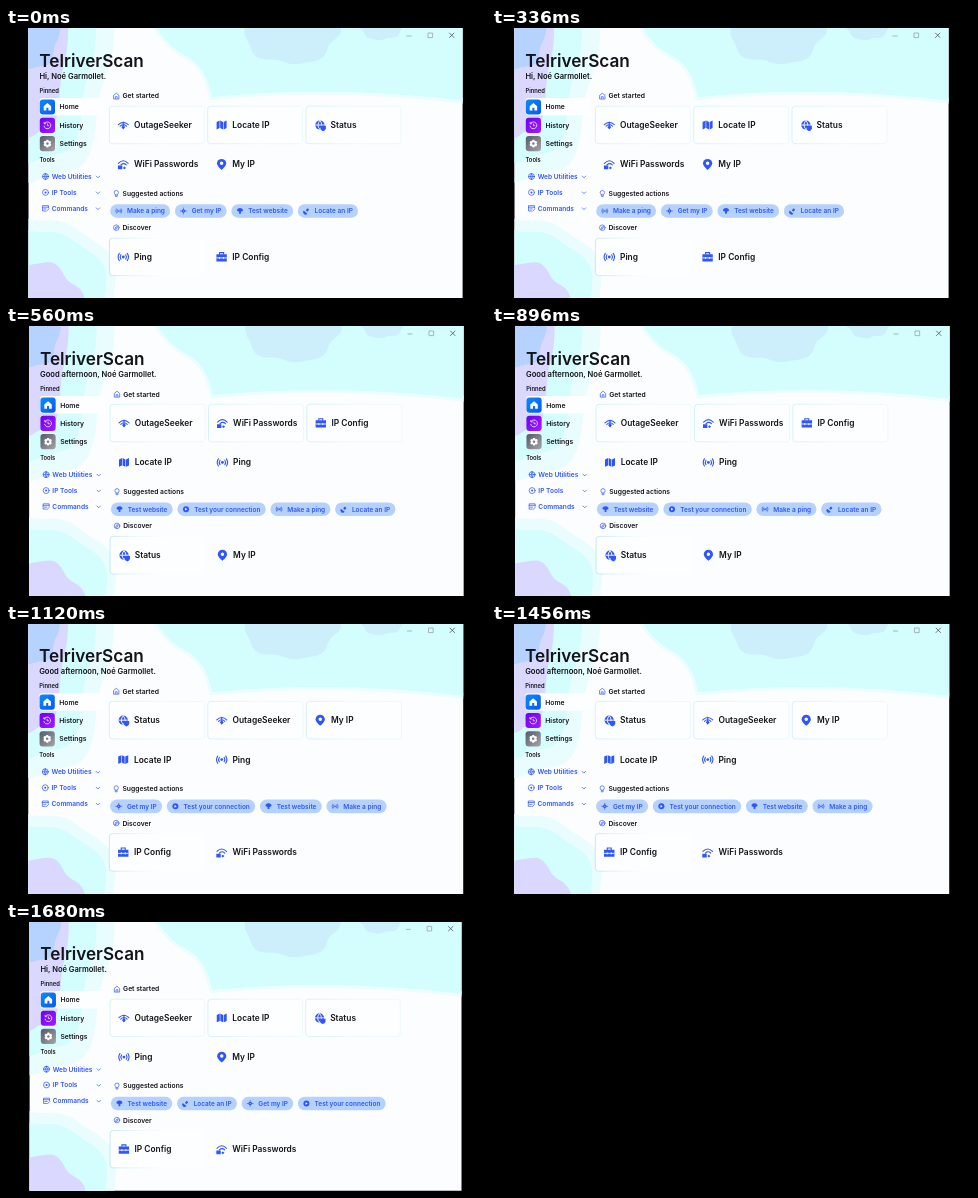
Write an HTML page that moves like this. It is 480 px wide and 270 px high and loops after 2240 ms.

```html
<!DOCTYPE html>
<html lang="en">
<head>
<meta charset="utf-8">
<style>
html, body { margin: 0; width: 100%; height: 100%; overflow: hidden; background: #000; }
svg { display: block; width: 100vw; height: 100vh; font-family: Inter, sans-serif; font-weight: 600; }
.icon { fill: #2f56f6; stroke: none; }
.line { fill: none; stroke: #2f56f6; stroke-width: 1.1; stroke-linecap: round; }
.white { fill: #fff; stroke: none; }
.cut { fill: none; stroke: #fff; stroke-width: .9; }
</style>
</head>
<body>
<svg id="stage" viewBox="0 0 480 270">
  <defs>
    <clipPath id="window"><rect x="22.5" y="-5" width="434.1" height="275.6"/></clipPath>
    <linearGradient id="home" x2="1" y2="1"><stop stop-color="#0a8cff"/><stop offset="1" stop-color="#0759ef"/></linearGradient>
    <linearGradient id="history" x2="1" y2="1"><stop stop-color="#6a00f4"/><stop offset="1" stop-color="#a51cff"/></linearGradient>
    <linearGradient id="settings" x2="1" y2="1"><stop stop-color="#55596b"/><stop offset="1" stop-color="#a7a5a6"/></linearGradient>
    <linearGradient id="edge" x2="1"><stop stop-color="#cdeff5"/><stop offset=".5" stop-color="#ecf8fb"/><stop offset="1" stop-color="#e8f7fb"/></linearGradient>
    <linearGradient id="fade" x2="1"><stop stop-color="#b9e3ec"/><stop offset=".6" stop-color="#e8f8fb" stop-opacity="0"/></linearGradient>
  </defs>
</svg>
<script>
const STEP = 560;
const INK = '#14141a', BLUE = '#2f56f6';
const CYAN = '#d4fdfe', LAVENDER = '#dad8fe', SKY_BLUE = '#b5d3fe';
const stage = document.getElementById('stage');

// Glyphs are drawn around 0,0 in a box of about 11 units.
const disc = r => `<circle class="icon" r="${r}"/>`;
const ring = '<circle class="line" r="4.5"/>';
const solid = d => `<path class="icon" d="${d}"/>`;
const line = d => `<path class="line" d="${d}"/>`;
const white = d => `<path class="white" d="${d}"/>`;
const cut = d => `<path class="cut" d="${d}"/>`;
const meridians = 'M-4.5 0H4.5M0-4.5Q-3.8 0 0 4.5M0-4.5Q3.8 0 0 4.5';

const glyphs = {
  outage: line('M-5-.3Q0-5 5-.3M-3.2 1.2Q0-2 3.2 1.2M0-3V3') + solid('M-2 2L0 4.5 2 2 0 .4z'),
  map: solid('M-5-3L-2-4.4V3L-5 4.4zM-1.4-4.4L1.4-3V4.4L-1.4 3zM2-3L5-4.4V3L2 4.4z'),
  status: disc(4.6) + cut(meridians) + solid('M.6.8H6V3.5Q5.4 5.7 3.3 6.2 1 5.6.6 3.5z'),
  wifi: line('M-4.8-1Q0-6 4.8-1M-2.4.6Q.4-2 3 .6') + solid('M-5.4 1.2H-1V5H-5.4zM1 2.2L2.8 3.6 1 5-.4 3.6z'),
  pin: solid('M0 5.6Q-4.6 1.6-4.6-1A4.6 4.4 0 0 1 4.6-1Q4.6 1.6 0 5.6z') + white('M0-2.8A1.7 1.7 0 0 1 0 .7 1.7 1.7 0 0 1 0-2.8'),
  ping: disc(1.4) + line('M-2.4-2.2Q-3.9 0-2.4 2.2M2.4-2.2Q3.9 0 2.4 2.2M-4-3.6Q-6.4 0-4 3.6M4-3.6Q6.4 0 4 3.6'),
  config: solid('M-5.2-2.8H5.2V4.4H-5.2z') + line('M-2-3V-4.4H2V-3') + cut('M-5.2.9H5.2M-2 0V2M2 0V2'),
  target: disc(3) + line('M-5 0H5M0-5V5') + cut('M-1 0H1'),
  site: solid('M-5-.5A5 4.5 0 0 1 5-.5L1.5 1.3V4.5H-1.5V1.3z'),
  play: disc(5) + white('M-1.5-2.2L2.2 0-1.5 2.2z'),
  locate: solid('M-4.6-.8A4 4 0 0 0 1.6 4.4zM-1-1.4L2-4.6 4.6-2 1.4 1.2z'),
  web: ring + line(meridians),
  tools: ring + disc(1.5),
  commands: line('M4.5-.5V-4H-4.5V4H0M-4.5-1.7H4.5M-2.5 1H1M1.5 4.5L5 1'),
  start: line('M-4.3 4.3V-1L0-4.6 4.3-1V4.3zM-1.5 4V1H1.5V4'),
  bulb: line('M-1.5 2Q-3.4.4-3.4-1.5A3.4 3.4 0 0 1 3.4-1.5Q3.4.4 1.5 2zV4.8H1.5V2'),
  compass: ring + line('M-2 2L-1-1 2-2 1 1z'),
  home: white('M0-4.6L4.4-.8V4.2H1.2V1H-1.2V4.2H-4.4V-.8z'),
  history: cut('M-3.3-2.3A4 4 0 1 1-4 .6M-3.8-4V-1.8H-1.6M0-2V.4H2'),
  settings: white('M-1-4.5H1L1.6-3 3.4-3.2 4.5-1.4 3.5 0 4.5 1.4 3.4 3.2 1.6 3 1 4.5H-1L-1.6 3-3.4 3.2-4.5 1.4-3.5 0-4.5-1.4-3.4-3.2-1.6-3zM0-1.5A1.5 1.5 0 0 0 0 1.5 1.5 1.5 0 0 0 0-1.5')
};
const cards = {
  outage: 'OutageSeeker', map: 'Locate IP', status: 'Status', wifi: 'WiFi Passwords',
  pin: 'My IP', ping: 'Ping', config: 'IP Config'
};
const actions = {
  ping: 'Make a ping', target: 'Get my IP', site: 'Test website',
  locate: 'Locate an IP', play: 'Test your connection'
};

// view: x, y, scale of the slightly shifted window
const scenes = [
  { view: [0, 0, 1], greeting: 'Hi',
    cards: 'outage map status wifi pin ping config', pills: 'ping target site locate' },
  { view: [.6, 0, 1.001], greeting: 'Good afternoon',
    cards: 'outage wifi config map ping status pin', pills: 'site play ping locate' },
  { view: [-.3, -1, 1.002], greeting: 'Good afternoon',
    cards: 'status outage pin map ping config wifi', pills: 'target play site ping' },
  { view: [1.2, -.6, .995], greeting: 'Hi',
    cards: 'outage map status ping pin config wifi', pills: 'site locate target play' }
];

const text = (x, y, size, label, fill = INK) =>
  `<text x="${x}" y="${y + size * .36}" font-size="${size}" fill="${fill}">${label}</text>`;
const glyph = (name, x, y, scale = 1) =>
  `<g transform="translate(${x} ${y}) scale(${scale})">${glyphs[name]}</g>`;
const box = (x, y, w, h, r, attrs) =>
  `<rect x="${x}" y="${y}" width="${w}" height="${h}" rx="${r}" ${attrs}/>`;

const pen = document.createElement('canvas').getContext('2d');
pen.font = '600 6.5px Inter, sans-serif';
const pillWidth = label => pen.measureText(label).width + 22;

// Ellipse with a rippled outline
function blob(x, y, rx, ry, fill) {
  const points = Array.from({ length: 90 }, (_, i) => {
    const a = i * Math.PI / 45, r = 1 + .05 * Math.sin(5 * a + x) + .03 * Math.sin(9 * a);
    return `${x + rx * r * Math.cos(a)},${y + ry * r * Math.sin(a)}`;
  });
  return `<polygon points="${points.join(' ')}" fill="${fill}"/>`;
}

const wallpaper = box(22, -5, 436, 285, 0, 'fill="#fcfdff"')
  + blob(22, 0, 86, 158, '#e9fdff') + blob(22, 0, 68, 138, CYAN)
  + blob(22, 0, 40, 112, LAVENDER) + blob(22, 0, 32, 42, SKY_BLUE)
  + `<path d="M148-5Q160 18 180 28T206 69Q330 57 460 73V-5z" fill="${CYAN}" stroke="#ecfdff" stroke-width="6" paint-order="stroke"/>`
  + blob(285, 0, 48, 36, '#cdeffc') + blob(375, -4, 22, 16, '#cdeffc')
  + blob(24, 290, 92, 104, '#e9fdff') + blob(24, 290, 82, 92, CYAN) + blob(34, 290, 46, 54, LAVENDER);

const controls = '<g fill="none" stroke="#9aa3ad" stroke-width=".8"><path d="M400.5 8h5M422 5h4.6v4.6H422z"/>'
  + '<path d="M443.2 4.8l5 5m0-5l-5 5" stroke="#4b5560"/></g>';

function sidebar(greeting) {
  let out = text(33.3, 33, 17.2, 'TelriverScan') + text(33.4, 48.5, 7.6, greeting + ', Noé Garmollet.');
  out += text(33.5, 62.5, 5.8, 'Pinned') + text(33.5, 131.5, 5.8, 'Tools');
  out += box(33.5, 70, 65, 17.5, 3, 'fill="#fdfeff"');
  ['Home', 'History', 'Settings'].forEach((label, i) => {
    const y = 79 + i * 18.3, name = label.toLowerCase();
    out += box(33.8, y - 7.6, 15.2, 15.2, 3, `fill="url(#${name})"`);
    out += glyph(name, 41.4, y, .85) + text(53.5, y, 6.8, label);
  });
  ['Web Utilities', 'IP Tools', 'Commands'].forEach((label, i) => {
    const y = 148.5 + i * 15.9;
    out += glyph(['web', 'tools', 'commands'][i], 39.5, y, .66) + text(45.7, y, 6.6, label, BLUE);
    out += `<path d="M90 ${y - .7}l2 2 2-2" fill="none" stroke="${BLUE}" stroke-width=".7"/>`;
  });
  return out;
}

function content(scene) {
  const heading = (name, y, label) => glyph(name, 110.3, y, .62) + text(116.5, y, 6.75, label);
  let out = heading('start', 68, 'Get started') + heading('bulb', 165.5, 'Suggested actions')
    + heading('compass', 199.7, 'Discover');

  scene.cards.split(' ').forEach((name, i) => {
    const column = i < 5 ? i % 3 : i - 5;
    const x = 103.4 + column * 98.3, y = i < 3 ? 97 : i < 5 ? 136.3 : 229;
    if (i < 3 || i === 5) {
      const edge = i < 3 ? 'edge' : 'fade';
      out += box(x, y - 18.8, 95, 37.5, 3, `fill="#fdfeff" stroke="url(#${edge})" stroke-width=".8"`);
    }
    out += glyph(name, x + 13.9, y) + text(x + 24.6, y, 8.4, cards[name]);
  });

  let x = 104.2;
  scene.pills.split(' ').forEach(name => {
    const width = pillWidth(actions[name]);
    out += box(x, 176.2, width, 13.6, 6.8, 'fill="#b5d1fe"');
    out += glyph(name, x + 8.6, 183, .6) + text(x + 16.8, 183, 6.5, actions[name], BLUE);
    x += width + 4.7;
  });
  return out;
}

stage.insertAdjacentHTML('beforeend', scenes.map(scene => {
  const [x, y, scale] = scene.view;
  return `<g class="scene" transform="translate(${x} ${y}) scale(${scale})"><g clip-path="url(#window)">`
    + wallpaper + controls + sidebar(scene.greeting) + content(scene) + '</g></g>';
}).join(''));
const views = [...stage.querySelectorAll('.scene')];

function draw() {
  const current = Math.floor(performance.now() / STEP) % views.length;
  views.forEach((view, i) => view.style.display = i === current ? '' : 'none');
  requestAnimationFrame(draw);
}
draw();
</script>
</body>
</html>
```
